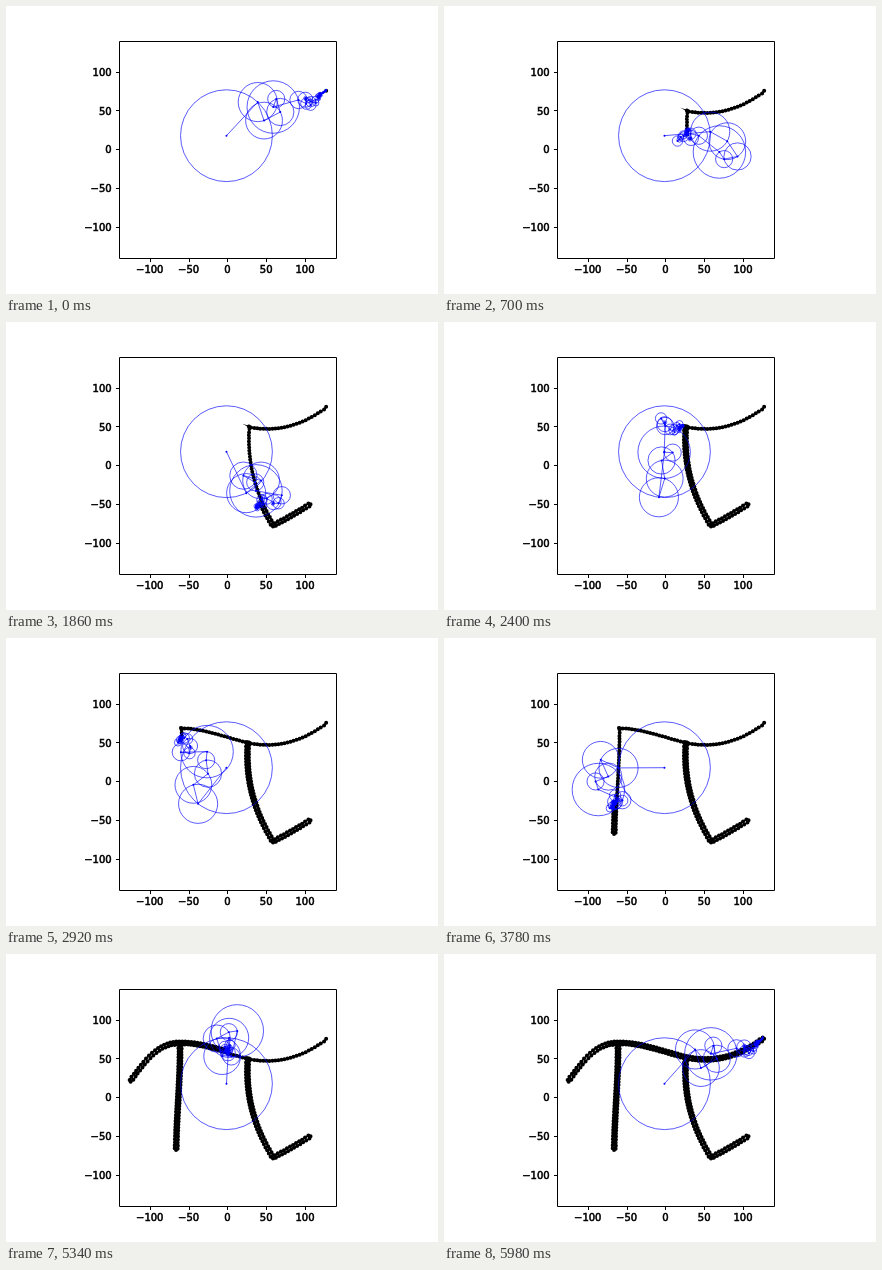
Recreate the animation shown at these times as an HTML page with a canvas. Size 432 px wide and 288 px high, loop 6000 ms.

```html
<!DOCTYPE html>
<html lang="en">
<head>
<meta charset="utf-8">
<title>Epicycles drawing pi</title>
<style>
  html, body { margin: 0; width: 100%; height: 100%; overflow: hidden; background: #fff; }
  svg, canvas { position: absolute; left: 0; top: 0; width: 432px; height: 288px; }
  text { font: 10px "DejaVu Sans", sans-serif; stroke: #000; stroke-width: .55px; }
  path { fill: none; stroke: #000; stroke-width: 1px; }
</style>
</head>
<body>
<svg id="axes" viewBox="0 0 432 288"></svg>
<canvas id="stage"></canvas>
<script>
const LOOP = 6000, STEPS = 300, ORDER = 100, TAU = 2 * Math.PI;
const ORIGIN = [221.4, 143.28], UNIT = 217.44 / 280;
const HALF = 1.5; // half the thickness of the letter's strokes

function bezier(a, b, c, d, count = 24) {
  return Array.from({ length: count + 1 }, (_, i) => {
    const t = i / count, u = 1 - t;
    return [0, 1].map(k =>
      u * u * u * a[k] + 3 * u * u * t * b[k] + 3 * u * t * t * c[k] + t * t * t * d[k]);
  });
}

// Shift a run of points sideways, always to the same side of travel.
function side(points) {
  return points.map(([x, y], i) => {
    const p = points[Math.max(i - 1, 0)], q = points[Math.min(i + 1, points.length - 1)];
    const dx = q[0] - p[0], dy = q[1] - p[1], length = Math.hypot(dx, dy);
    return [x + HALF * dy / length, y - HALF * dx / length];
  });
}

// Walk around the letter's centre lines, out and back along each limb.
function letterOutline() {
  const right = [242, 103.3], left = [174, 89], heel = [267, 203.5];
  const arm = bezier(right, [268, 109], [294, 103.5], [320, 84]);
  const leg = bezier(right, [239, 140], [247.5, 172], heel);
  const foot = bezier(heel, [280, 197], [292, 190], [304.5, 182]);
  const bar = bezier(right, [222, 98.5], [195, 88], left);
  const stem = bezier(left, [174.5, 125], [170.5, 160], [170.2, 196]);
  const tail = bezier(left, [152, 88.5], [139, 107], [124, 127.5]);
  const limb = [...leg, ...foot.slice(1)];
  const back = points => [...points].reverse();
  return [back(arm), limb, back(limb), bar, stem, back(stem), tail, back(tail), back(bar), arm]
    .flatMap(side);
}

// The pen's pace follows the larger of the horizontal and vertical travel.
function resample(points, count) {
  const legs = points.map((a, i) => {
    const b = points[(i + 1) % points.length];
    return { a, b, size: Math.max(Math.abs(b[0] - a[0]), Math.abs(b[1] - a[1])) };
  });
  const total = legs.reduce((sum, leg) => sum + leg.size, 0);
  const out = [];
  let leg = 0, start = 0;
  for (let i = 0; i < count; i++) {
    const at = total * i / count;
    while (at >= start + legs[leg].size) start += legs[leg++].size;
    const { a, b, size } = legs[leg], f = (at - start) / size;
    out.push([a[0] + (b[0] - a[0]) * f, a[1] + (b[1] - a[1]) * f]);
  }
  return out;
}

function coefficient(samples, freq) {
  let re = 0, im = 0;
  samples.forEach(([x, y], i) => {
    const angle = -TAU * freq * i / samples.length;
    re += x * Math.cos(angle) - y * Math.sin(angle);
    im += x * Math.sin(angle) + y * Math.cos(angle);
  });
  re /= samples.length;
  im /= samples.length;
  return { freq, radius: Math.hypot(re, im), phase: Math.atan2(im, re) };
}

const samples = resample(letterOutline(), STEPS * 4);
const mean = [0, 1].map(k => samples.reduce((sum, p) => sum + p[k], 0) / samples.length);
const wheels = [];
for (let n = 1; n <= ORDER; n++) wheels.push(coefficient(samples, n), coefficient(samples, -n));

function joints(step) {
  const points = [mean];
  let [x, y] = mean;
  for (const { freq, radius, phase } of wheels) {
    const angle = phase + TAU * freq * step / STEPS;
    x += radius * Math.cos(angle);
    y += radius * Math.sin(angle);
    points.push([x, y]);
  }
  return points;
}

const trail = Array.from({ length: STEPS }, (_, i) => joints(i).pop());

function drawAxes() {
  const snap = v => Math.floor(v + .5) + .5;
  let lines = "M113.5 35.5H330.5V252.5H113.5Z", labels = "";
  for (let v = -100; v <= 100; v += 50) {
    const x = ORIGIN[0] + v * UNIT, y = ORIGIN[1] - v * UNIT;
    const name = String(v).replace("-", "\u2212");
    lines += `M${snap(x)} 252.5v3.5M113.5 ${snap(y)}h-3.5`;
    labels += `<text x="${x}" y="267" text-anchor="middle">${name}</text>` +
      `<text x="105.7" y="${y + 4.2}" text-anchor="end">${name}</text>`;
  }
  document.getElementById("axes").innerHTML = `<path d="${lines}"/>${labels}`;
}

const canvas = document.getElementById("stage"), ctx = canvas.getContext("2d");
const ratio = window.devicePixelRatio || 1;
canvas.width = 432 * ratio;
canvas.height = 288 * ratio;
ctx.scale(ratio, ratio);

function polyline(points, width) {
  ctx.lineWidth = width;
  ctx.beginPath();
  points.forEach(p => ctx.lineTo(...p));
  ctx.stroke();
}

function circles(points, radius) {
  ctx.beginPath();
  points.forEach(([x, y], i) => {
    const r = radius(i);
    ctx.moveTo(x + r, y);
    ctx.arc(x, y, r, 0, TAU);
  });
}

function draw(step) {
  ctx.clearRect(0, 0, 432, 288);
  const drawn = trail.slice(0, step + 1);
  ctx.strokeStyle = ctx.fillStyle = "#000";
  polyline(drawn, 1.5);
  circles(drawn, () => 2);
  ctx.fill();

  const arm = joints(step);
  ctx.strokeStyle = ctx.fillStyle = "#00f";
  polyline(arm, .65);
  circles(arm.slice(0, -1), i => wheels[i].radius);
  ctx.stroke();
  circles(arm, () => 1);
  ctx.fill();
}

const begin = performance.now();
let shown = -1;
function tick() {
  const time = Math.max(0, performance.now() - begin) % LOOP;
  const step = Math.floor(time * STEPS / LOOP);
  if (step !== shown) draw(shown = step);
  requestAnimationFrame(tick);
}

drawAxes();
tick();
</script>
</body>
</html>
```
